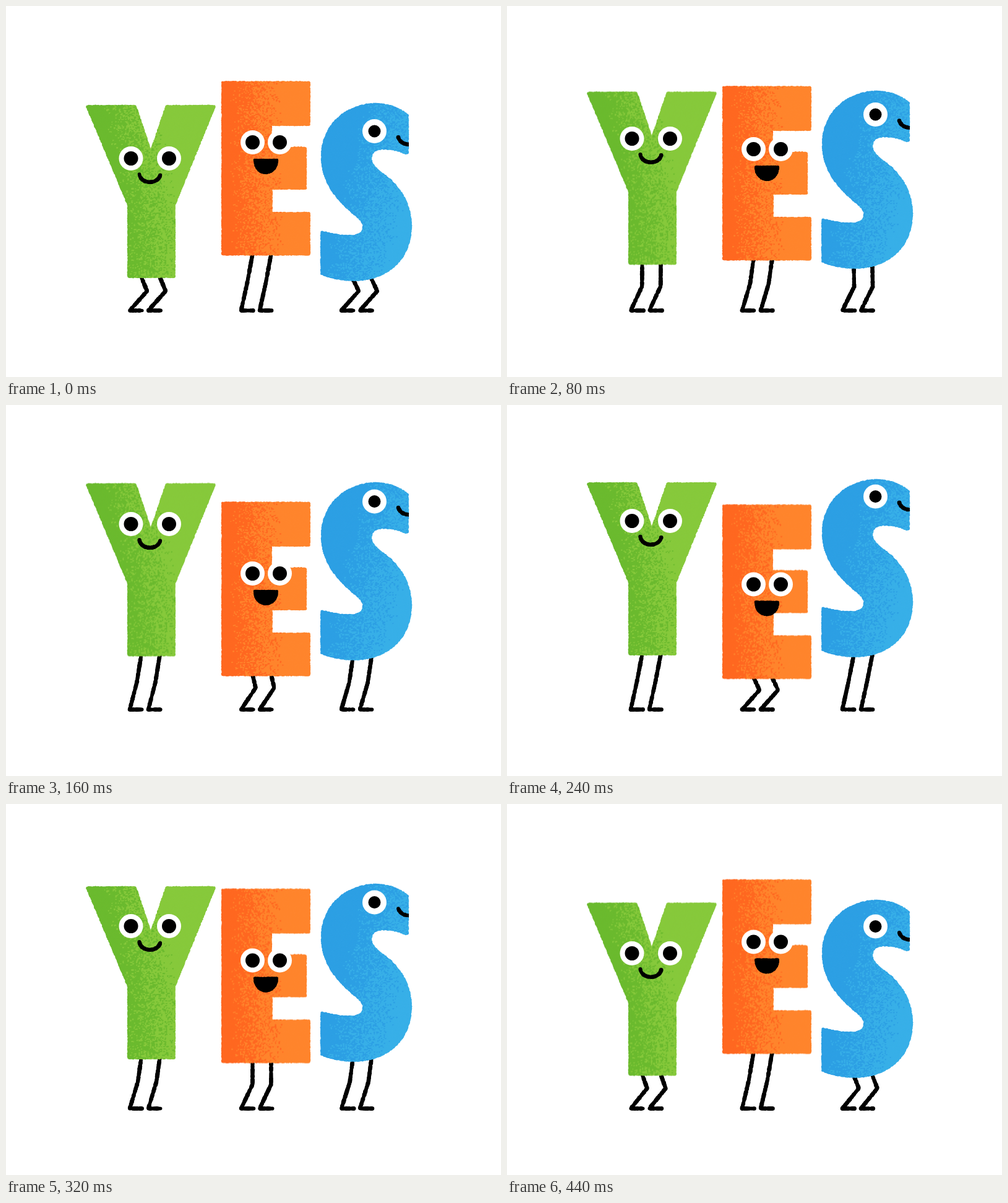
Write an HTML page with a canvas that moves like this. It is 800 px wide and 600 px high and loops after 0.48 s.

```html
<!DOCTYPE html>
<html lang="en">
<head>
<meta charset="utf-8">
<title>Yes</title>
<style>
html, body { margin: 0; height: 100%; overflow: hidden; background: #fff; }
canvas { display: block; }
</style>
</head>
<body>
<canvas id="stage" width="800" height="600"></canvas>
<script>
const STEP = 40, STEPS = 12, FLOOR = 493;
const stage = document.getElementById('stage').getContext('2d');
const tracer = document.createElementNS('http://www.w3.org/2000/svg', 'path');

let seed = 1;
const random = () => (seed = seed * 16807 % 2147483647) / 2147483647;
const clamp = v => Math.max(0, Math.min(1, v));

// body and face: vertical offset at each step; ramp: centre x of the shading at height y
const letters = [
  {
    d: 'M131 162H209L234 237L259.5 162H337L272 322V438H198V322Z',
    dark: '#6aba2d', light: '#86c93a', spread: 90,
    ramp: y => 198 + 38 * clamp((y - 160) / 160),
    foot: 200, base: 438,
    body: [0, -10.5, -21.5, -28.5, -33.5, -35.5, -35, -32.5, -27, -14.5, -5, -0.5],
    face: [0, -15, -32, -45, -54, -58, -59, -56, -49, -32, -16, -5],
    bend: f => 1 + f / 59,
    eyes: [202, 263.5], eyeY: 246.5, pupil: 11.5,
    mouth: 'M215.5 272C218 289 247 289 249.5 272'
  },
  {
    d: 'M350 123.5H490V192H428V229.5H484V295H429V335H490V401.5H350Z',
    dark: '#ff671f', light: '#ff842b', spread: 85,
    ramp: () => 404,
    foot: 380, base: 401,
    body: [0, 2.5, 8, 21, 35, 39.5, 39.5, 29, 15.5, 4.5, 1, 0.5],
    face: [0, 4, 11, 30, 52, 65, 69.5, 54, 32.5, 15.5, 7, 2.5],
    bend: f => f / 69.5,
    eyes: [398.5, 442.5], eyeY: 220.5, pupil: 11.5,
    mouth: 'M402 249H438C438 277 402 277 402 249Z', open: true
  },
  {
    d: 'M649 177C634 164 615 159 597 159C550 159 511 193 511 243' +
       'C511 285 535 313 565 338C574 345 579 351 578 358C577 368 568 372 558 372' +
       'C545 373 526 370 510 365V433C525 439 543 443 562 443C617 443 654 408 654 356' +
       'C654 326 641 300 620 281C604 267 589.5 260 589.5 247' +
       'C589.5 236 597 230.5 609 230.5C623 230.5 635 233 646 238L649 237Z',
    dark: '#2b9fe4', light: '#36afe8', spread: 110,
    ramp: y => 630 - 70 * (y - 158) / 286,
    foot: 542, base: 441,
    body: [0, -9.5, -20, -27, -32, -36, -37, -34.5, -28, -16, -7, -2],
    face: [0, -13, -27, -38, -46.5, -52.5, -54.5, -51, -43.5, -27, -14, -4.5],
    bend: f => 1 + f / 54.5,
    eyes: [595.5], eyeY: 202.5, pupil: 10,
    mouth: 'M634 212.5C637 221 644 224 654 224', edge: 651
  }
];

function disc(ctx, x, y, r, color) {
  ctx.fillStyle = color;
  ctx.beginPath();
  ctx.arc(x, y, r, 0, 2 * Math.PI);
  ctx.fill();
}

// Ink a path with small discs of uneven size
function ink(ctx, d, r, wobble, gap) {
  tracer.setAttribute('d', d);
  const length = tracer.getTotalLength();
  for (let s = 0; s <= length; s += gap) {
    const p = tracer.getPointAtLength(s);
    disc(ctx, p.x, p.y, r + (random() - 0.5) * wobble, '#000');
  }
}

// Paint a letter once: rough silhouette filled with two-tone grain
function paint(letter) {
  const canvas = document.createElement('canvas');
  canvas.width = 800;
  canvas.height = 600;
  const ctx = canvas.getContext('2d');
  ctx.fill(new Path2D(letter.d));
  ink(ctx, letter.d, 1.9, 1.1, 1.5);
  ctx.globalCompositeOperation = 'source-atop';
  const left = letter.foot - 74;
  for (let y = 118; y < 448; y += 2) {
    for (let x = left; x < left + 216; x += 2) {
      const share = (x - letter.ramp(y)) / letter.spread + 0.5;
      ctx.fillStyle = random() < share ? letter.light : letter.dark;
      ctx.fillRect(x + random(), y + random(), 3, 3);
    }
  }
  return canvas;
}

function drawLegs({ foot, base, bend }, body, face) {
  const b = bend(face);
  for (const x of [foot, foot + 30]) {
    ink(stage, `M${x + 18.5} ${base + body}L${x + 10 + 18 * b} ${447 + 14 * b}` +
      `L${x} ${FLOOR - 0.5}H${x + 20.5}`, 3.1, 1, 1.5);
  }
}

function drawFace({ eyes, eyeY, pupil, mouth, open, edge }, face) {
  stage.save();
  stage.translate(0, face);
  for (const x of eyes) disc(stage, x, eyeY, 19.5, '#fff');
  for (const x of eyes) disc(stage, x, eyeY, pupil, '#000');
  if (edge) {
    stage.beginPath();
    stage.rect(0, 0, edge, 600);
    stage.clip();
  }
  if (open) stage.fill(new Path2D(mouth));
  ink(stage, mouth, open ? 2 : 3.1, 0.7, 1.5);
  stage.restore();
}

for (const letter of letters) letter.image = paint(letter);

let shown = -1;
function render() {
  const step = Math.floor(performance.now() / STEP) % STEPS;
  if (step !== shown) {
    shown = step;
    seed = 77;
    stage.fillStyle = '#fff';
    stage.fillRect(0, 0, 800, 600);
    for (const letter of letters) {
      const body = letter.body[step], face = letter.face[step];
      drawLegs(letter, body, face);
      stage.drawImage(letter.image, 0, body);
      drawFace(letter, face);
    }
  }
  requestAnimationFrame(render);
}
render();
</script>
</body>
</html>
```
